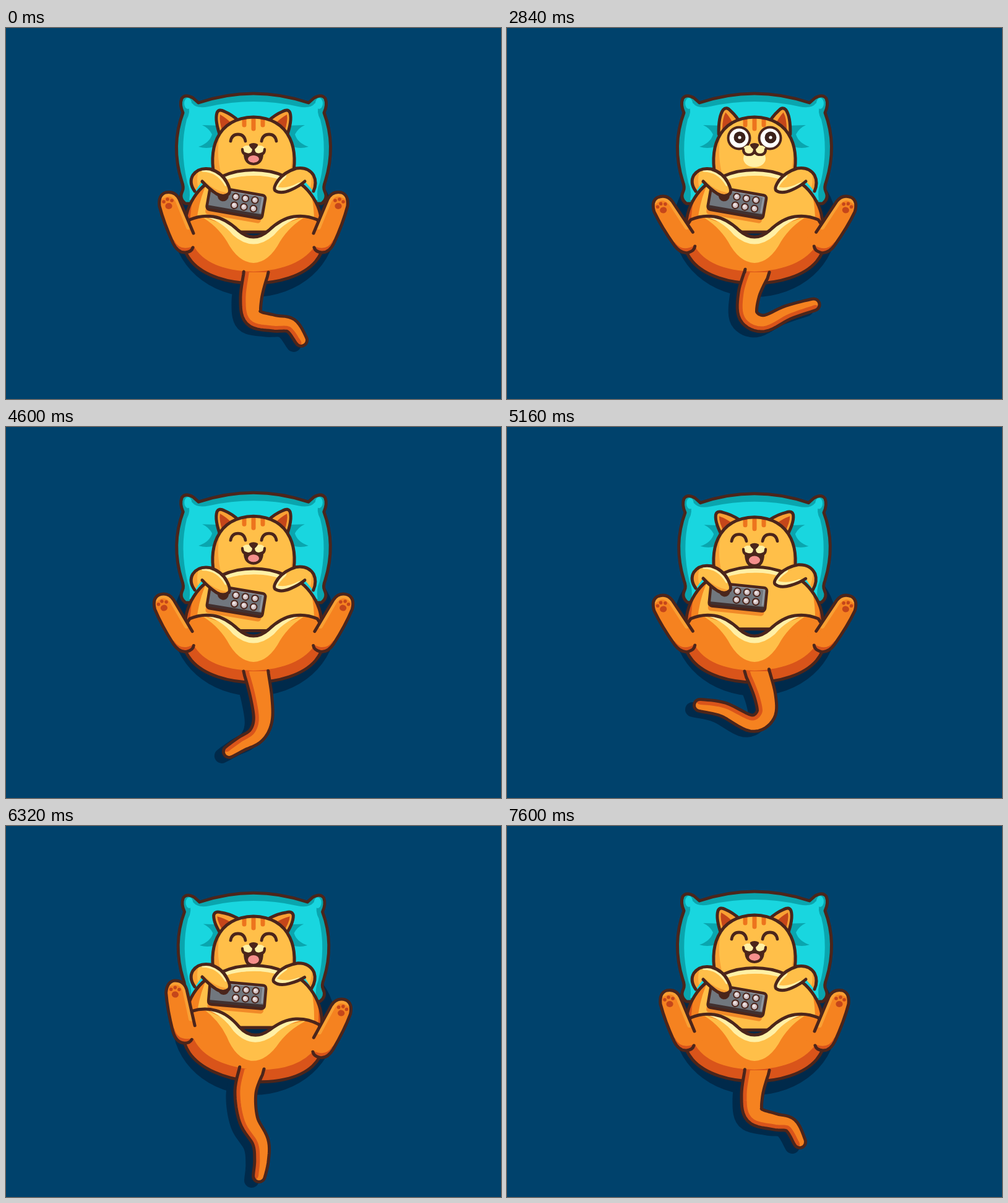
Animation, 800 px wide and 600 px high, one loop 7.64 s. Source, as an HTML page with a canvas:

```html
<!DOCTYPE html>
<html lang="en">
<head>
<meta charset="utf-8">
<title>Laughing cat</title>
<style>
html, body { margin: 0; width: 100%; height: 100%; overflow: hidden; background: #00426c; }
canvas { display: block; width: 800px; height: 600px; }
</style>
</head>
<body>
<canvas id="stage" width="800" height="600"></canvas>
<script>
const ctx = document.getElementById('stage').getContext('2d');
const LOOP = 7640;
const C = {
  bg: '#00426c', shadow: '#002a4b', line: '#4b251b',
  teal: '#0aa5ae', aqua: '#19d6df',
  yellow: '#ffbf49', amber: '#f9a034', orange: '#f58220', rust: '#d9541a', pad: '#c5461a',
  cream: '#fff0a6', tongue: '#f58f8c', grey: '#71777e'
};

// Rows are [time, value, ...].
const HEAVE = [[0, 0], [4400, 0], [5450, 1], [7000, 1], [7500, 0]];
const HIPS = [[0, 0], [5960, 0], [6320, 6], [6720, -6.5], [6920, -6], [7300, 0]];
const KICKS = [[0, 0, 0], [400, -13, -13], [760, -11, -11], [3600, -11, -11], [3780, -7, -7],
  [3960, -11, -11], [4160, -15, -15], [4360, -11, -11], [4560, -7, -7], [4760, -16, -16],
  [5000, -11, -11], [5960, -11, -11], [6320, 4, 0], [6720, -21, -15], [6920, -20, -14], [7300, 0, 0]];
const EARS = [[0, 0], [840, 0], [960, 23], [1100, 19], [3140, 19], [3360, 0], [4500, 0], [5600, -15], [7000, -15], [7500, 0]];
const EYES = [[0, 0], [860, 0], [980, 1.08], [1080, 1], [2060, 1], [2120, 0.12], [2200, 1],
  [2500, 1], [2560, 0.12], [2640, 1], [3140, 1], [3240, 0]];
const WAVE = [[0, 0], [3600, 0], [3800, 1], [4100, 1], [4260, 0], [6560, 0], [6760, 1], [7060, 1], [7220, 0]];

const CURL_R = [404, 395, 391, 430, 390, 465, 415, 478, 455, 459, 497, 450];
const FLICK = [404, 395, 391, 430, 390, 465, 415, 477, 453, 462, 492, 441];
const CURL_L = [404, 395, 417, 435, 418, 465, 395, 479, 350, 457, 312, 450];
const TAIL = [
  [0, 404, 395, 396, 437, 400, 468, 431, 477, 460, 481, 477, 505],
  [500, ...CURL_R], [860, ...CURL_R], [1000, ...FLICK], [1200, ...CURL_R],
  [2000, ...CURL_R], [2300, ...FLICK], [2700, ...CURL_R], [3100, ...FLICK], [3480, ...CURL_R],
  [3960, 404, 395, 399, 435, 410, 470, 430, 495, 447, 522, 453, 557],
  [4250, 404, 395, 407, 440, 412, 480, 416, 510, 416, 545, 414, 569],
  [5100, ...CURL_L], [5960, ...CURL_L],
  [6320, 397, 393, 387, 430, 392, 475, 411, 510, 413, 540, 409, 566],
  [6920, 409, 393, 416, 435, 411, 485, 401, 525, 400, 550, 402, 566],
  [7600, 404, 395, 396, 435, 400, 467, 432, 478, 458, 484, 473, 511]
];

// Smooth cyclic interpolation that never overshoots its keys.
function track(rows, t) {
  const n = rows.length;
  let i = n - 1;
  while (rows[i][0] > t) i--;
  const row = j => rows[(j + n) % n];
  const time = j => row(j)[0] + LOOP * Math.floor(j / n);
  const slope = (j, k) => (row(j + 1)[k] - row(j)[k]) / (time(j + 1) - time(j));
  const tangent = (j, k) => {
    const a = slope(j - 1, k), b = slope(j, k);
    return a * b > 0 ? 2 * a * b / (a + b) : 0;
  };
  const h = time(i + 1) - time(i), u = (t - time(i)) / h, v = 1 - u;
  return row(i).slice(1).map((a, m) => {
    const k = m + 1;
    return a * v * v * (1 + 2 * u) + row(i + 1)[k] * u * u * (1 + 2 * v)
      + h * u * v * (v * tangent(i, k) - u * tangent(i + 1, k));
  });
}

const cache = {};
const path = d => typeof d === 'string' ? cache[d] || (cache[d] = new Path2D(d)) : d;

function fill(d, color) {
  ctx.fillStyle = color;
  ctx.fill(path(d));
}

function stroke(d, width = 5, color = C.line) {
  ctx.lineWidth = width;
  ctx.strokeStyle = color;
  ctx.stroke(path(d));
}

function dot(x, y, rx, color, ry = rx) {
  ctx.beginPath();
  ctx.ellipse(x, y, rx, ry, 0, 0, 7);
  ctx.fillStyle = color;
  ctx.fill();
}

function group(draw) {
  ctx.save();
  draw();
  ctx.restore();
}

function inside(d, draw) {
  group(() => {
    ctx.clip(path(d));
    draw();
  });
}

function turn(deg, x, y) {
  ctx.translate(x, y);
  ctx.rotate(deg * Math.PI / 180);
  ctx.translate(-x, -y);
}

function flip() {
  ctx.translate(800, 0);
  ctx.scale(-1, 1);
}

function bothSides(draw) {
  group(() => draw(0));
  group(() => { flip(); draw(1); });
}

function pillow(heave) {
  const edge = 'M290 284 Q279 276 285 264 Q288 258 284 248 Q266 190 286 137 Q280 124 284 114 Q290 106 302 113 L311 121 Q400 91 489 121 L498 113 Q510 106 516 114 Q520 124 514 137 Q534 190 516 248 Q512 258 515 264 Q521 276 510 284Z';
  const face = 'M294 122 Q296 117 301 122 Q308 131 328 127 Q400 111 472 127 Q492 131 499 122 Q504 117 506 122 Q501 136 508 148 Q520 195 507 250 Q501 264 504 278 L296 278 Q299 264 293 250 Q280 195 292 148 Q299 136 294 122Z';
  ctx.translate(400, 190 + heave);
  ctx.scale(1 - 0.022 * heave, 1 - 0.015 * heave);
  ctx.translate(-400, -190);
  fill(edge, C.teal);
  fill(face, C.aqua);
  dot(294, 122, 6, C.aqua, 9);
  dot(506, 122, 6, C.aqua, 9);
  bothSides(() => fill('M350 158 L317 157 Q328 162 333 172 Q329 186 311 192 Q324 196 336 192 L350 198Z', C.teal));
  stroke(edge);
}

function ear(angle) {
  const shape = 'M347 177 Q337 150 341 137 Q344 130 353 135 Q365 140 377 151 L368 168Z';
  turn(angle, 360, 160);
  fill(shape, C.amber);
  fill('M350 168 Q344 150 346 140 Q357 146 366 156Z', C.pad);
  stroke(shape);
}

function openEye(amount, side) {
  ctx.translate(375, 178);
  ctx.scale(Math.min(1.08, 0.6 + amount * 0.4), amount);
  dot(0, 0, 19.5, C.line);
  dot(0, 0, 15.5, '#fff');
  const x = side ? -1 : 1;
  dot(x, -1, 9.5, '#3b211b');
  dot(x, -1, 2.6, '#fff');
}

function head(ears, eyes, heave) {
  const skull = 'M338 245 C326 200 338 146 400 144 C462 146 474 200 462 245Z';
  const smile = 'M382 196 Q382 205 391 205 Q400 205 400 196 Q400 205 409 205 Q418 205 418 196';
  ctx.translate(0, 2 * heave);
  bothSides(() => ear(ears));
  fill(skull, C.yellow);
  inside(skull, () => {
    fill('M320 130 L350 158 Q335 195 351 250 L320 250Z', C.amber);
    fill('M480 150 L458 168 Q468 200 456 250 L480 250Z', C.amber);
    ctx.lineCap = 'round';
    stroke('M385 140 V157 M415 140 V157', 7, '#ed741d');
    stroke('M400 140 V163', 7, '#ed741d');
  });
  stroke(skull);
  if (eyes > 0.08) bothSides(side => openEye(eyes, side));
  else bothSides(() => stroke('M363 183 Q365 172 375 172 Q385 172 387 183', 4.8));

  if (eyes > 0.08) dot(400, 211, 18, C.cream, 14);
  dot(390, 198, 9, C.cream, 8);
  dot(410, 198, 9, C.cream, 8);
  if (eyes <= 0.08) {
    const low = 223 + 5 * heave;
    const mouth = new Path2D(`M386 203 Q393 207 400 202 Q407 207 414 203 Q414 ${low - 4} 400 ${low - 3} Q386 ${low - 4} 386 203Z`);
    fill(mouth, C.line);
    inside(mouth, () => dot(400, 212 + 2 * heave, 9, C.tongue, 6 + heave));
    stroke(mouth, 4);
  }
  stroke(smile, 4.2);
  fill('M393 188 Q400 184 407 188 Q408 191 402 196 Q400 198 398 196 Q392 191 393 188Z', C.line);
}

function raisedArm(wave, heave) {
  const arm = 'M463 245 Q470 213 485 198 Q502 184 517 188 Q526 192 519 203 Q497 225 497 268 L470 268Z';
  ctx.translate(0, -5 * heave);
  turn((wave - 1) * 60, 485, 250);
  fill(arm, C.yellow);
  inside(arm, () => {
    stroke('M468 245 Q475 215 490 201 Q503 192 517 193', 7, C.cream);
    stroke('M524 200 Q497 225 496 268', 12, C.amber);
  });
  stroke(arm);
}

function belly(heave) {
  const shape = 'M290 330 C286 292 310 250 349 240 C380 226 420 226 451 240 C490 250 514 292 510 330Z';
  ctx.translate(0, -4 * heave);
  fill(shape, C.yellow);
  inside(shape, () => {
    fill('M270 220 H345 Q308 262 306 340 H270Z', C.orange);
    fill('M270 240 H312 Q296 280 297 340 H270Z', C.rust);
    fill('M484 240 Q502 280 497 340 H530 V240Z', C.orange);
    fill('M503 260 Q507 290 504 340 H530 V260Z', C.rust);
    fill('M345 246 Q400 222 462 245 Q400 232 345 246Z', C.cream);
    stroke('M352 241 Q400 225 448 241', 11, C.cream);
  });
  stroke(shape);
}

function remote(heave) {
  const box = new Path2D();
  box.roundRect(-45, -21, 91, 38, 5);
  ctx.translate(371 + 2 * heave, 284 - 9 * heave);
  ctx.rotate((10 - 5 * heave) * Math.PI / 180);
  group(() => {
    ctx.translate(-1, 8);
    fill(box, '#f18a28');
  });
  fill(box, '#41302f');
  inside(box, () => {
    ctx.fillStyle = C.grey;
    ctx.fillRect(-45, -21, 91, 31);
    ctx.fillStyle = '#9298a0';
    ctx.fillRect(-45, -19, 91, 2);
    ctx.fillRect(40, -19, 3, 27);
  });
  stroke(box, 4.5);
  dot(-22, -9, 9, C.line);
  for (let i = 0; i < 6; i++) {
    const x = -1.5 + i % 3 * 15.7, y = i < 3 ? -11 : 3;
    dot(x, y, 6.3, C.line);
    dot(x, y, 4.3, '#cfc0c2');
    dot(x - 1, y - 1, 2.3, '#eee2e2');
  }
}

function arm() {
  const shape = 'M305 264 Q295 250 302 238 Q311 225 330 228 Q349 234 357 250 Q364 263 360 268 Q352 275 340 268 Q328 260 317 248';
  fill(shape, C.yellow);
  inside(shape, () => {
    fill('M290 270 V236 Q304 232 314 226 Q306 238 311 262Z', C.amber);
    stroke('M318 251 Q335 268 356 271', 9, C.amber);
    stroke('M318 231 Q342 231 355 254', 3.5, C.cream);
  });
  stroke(shape);
}

function rightArm(wave, heave) {
  flip();
  ctx.translate(0, -3 * heave);
  turn(-9 * heave - 35 * wave, 315, 245);
  const shape = 'M303 264 Q297 250 303 238 Q312 224 331 227 Q350 233 360 246 Q369 259 365 263 Q356 269 340 262 Q326 256 317 248';
  fill(shape, C.yellow);
  inside(shape, () => {
    fill('M290 270 V236 L310 226 Q303 240 309 264Z', C.amber);
    stroke('M326 254 Q348 266 366 260 Q363 250 351 239', 8, C.cream);
  });
  stroke(shape);
}

const CREST = 'M297 310 Q315 302 335 305 Q355 308 375 327 Q400 349 425 327 Q445 308 465 305 Q485 302 503 310';

function lowerBody() {
  const shape = CREST + ' C522 335 515 360 500 378 C480 401 440 413 400 413 C360 413 320 401 300 378 C285 360 278 335 297 310Z';
  fill(shape, C.orange);
  inside(shape, () => {
    fill('M275 335 L303 352 Q325 392 400 394 Q475 391 501 350 L530 340 V430 H270Z', C.rust);
    fill('M312 303 Q340 318 357 345 Q375 379 400 380 Q425 379 443 345 Q460 318 488 303 L400 335Z', C.yellow);
    fill('M310 303 Q345 308 367 335 Q400 364 433 335 Q455 308 490 303 Q440 300 400 338 Q360 300 310 303Z', C.cream);
  });
  stroke(shape);
}

function leg(angle) {
  const shape = 'M303 332 L280 277 Q273 263 258 266 Q246 270 248 288 Q255 315 270 348 Q278 364 290 363 Q300 362 302 355';
  turn(angle, 292, 345);
  fill(shape + ' L318 345Z', C.orange);
  inside(shape, () => {
    stroke('M252 272 Q269 262 278 280 L295 322', 8, C.amber);
    stroke('M268 346 Q278 366 302 358', 9, C.rust);
  });
  stroke(shape);
  dot(263, 288, 5.6, C.pad, 5);
  dot(255, 281, 2.8, C.pad);
  dot(261, 277, 2.8, C.pad);
  dot(268, 279, 2.8, C.pad);
}

function tailShape(p) {
  const pts = [];
  for (let i = 0; i < 12; i += 2) pts.push([p[i], p[i + 1]]);
  const point = j => pts[Math.max(0, Math.min(5, j))];
  const spine = [];
  for (let s = 0; s <= 40; s++) {
    const i = Math.min(4, Math.floor(s / 8)), u = s / 8 - i;
    spine.push([0, 1].map(k => {
      const [a, b, c, d] = [-1, 0, 1, 2].map(o => point(i + o)[k]);
      return b + u / 2 * (c - a + u * (2 * a - 5 * b + 4 * c - d + u * (3 * (b - c) + d - a)));
    }));
  }
  const left = new Path2D(), edge = new Path2D(), back = [];
  spine.forEach(([x, y], s) => {
    const a = spine[Math.max(0, s - 1)], b = spine[Math.min(40, s + 1)];
    const dir = s ? Math.atan2(b[1] - a[1], b[0] - a[0]) : Math.PI / 2;
    const w = 20 - 10.5 * Math.pow(s / 40, 0.8);
    const nx = -Math.sin(dir) * w, ny = Math.cos(dir) * w;
    left.lineTo(x + nx, y + ny);
    edge.lineTo(x + nx, y + ny);
    back.unshift([x - nx, y - ny]);
    if (s === 40) edge.arc(x, y, w, dir + Math.PI / 2, dir - Math.PI / 2, true);
  });
  back.forEach(([x, y]) => edge.lineTo(x, y));
  return { left, edge };
}

function tail({ left, edge }) {
  fill(edge, C.orange);
  inside(edge, () => stroke(left, 17, C.rust));
  stroke(edge);
}

function shadow(shape) {
  dot(401, 318, 132, C.shadow, 117);
  ctx.translate(-12, 7);
  fill(shape.edge, C.shadow);
  stroke(shape.edge, 5, C.shadow);
}

function draw(t) {
  const [heave] = track(HEAVE, t), [hips] = track(HIPS, t), [wave] = track(WAVE, t);
  const [ears] = track(EARS, t), [eyes] = track(EYES, t);
  const kicks = track(KICKS, t), shape = tailShape(track(TAIL, t));

  ctx.fillStyle = C.bg;
  ctx.fillRect(0, 0, 800, 600);
  ctx.lineCap = ctx.lineJoin = 'round';
  group(() => shadow(shape));
  group(() => pillow(heave));
  group(() => head(ears, eyes, heave));
  if (wave > 0.5) group(() => raisedArm(wave, heave));
  group(() => belly(heave));
  group(() => remote(heave));
  group(() => { ctx.translate(0, -4 * heave); arm(); });
  if (wave <= 0.5) group(() => rightArm(wave, heave));
  group(() => {
    turn(hips, 400, 340);
    lowerBody();
    bothSides(side => leg(kicks[side]));
  });
  tail(shape);
}

const start = performance.now();
function frame() {
  draw((performance.now() - start) % LOOP);
  requestAnimationFrame(frame);
}
frame();
</script>
</body>
</html>
```
